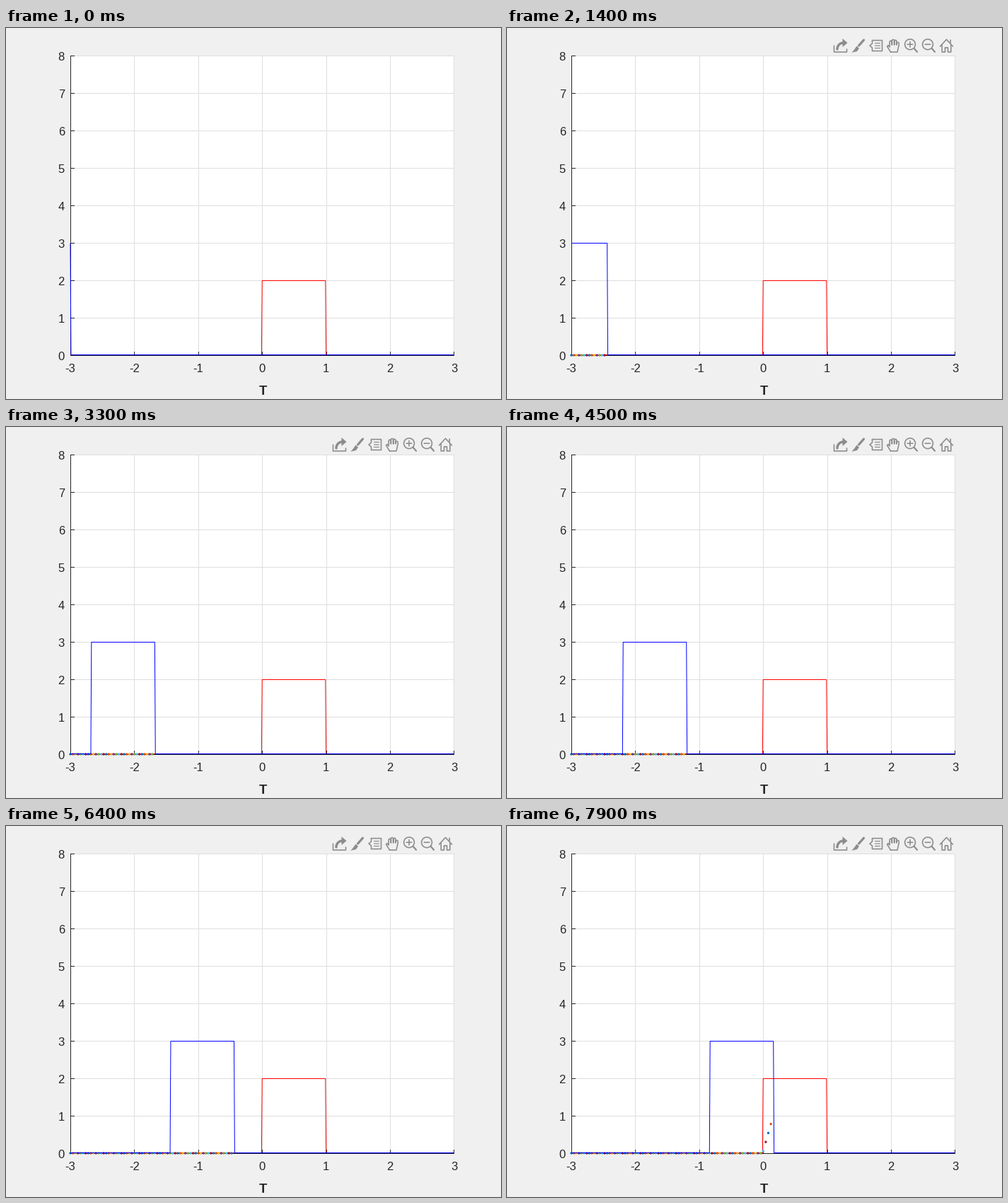
Recreate the animation shown at these times as a matplotlib script. Size 700x525 px, loop 8 s.

```python
import matplotlib.pyplot as plt
import numpy as np
from matplotlib.animation import FuncAnimation
from matplotlib.patches import Circle, Polygon, Rectangle

W, H, DPI = 700, 525, 100
PT = 72 / DPI                       # points per pixel
FRAMES, STEP = 80, 0.04
X0, XS = 91.0, 542.5 / 6            # plot left edge, pixels per unit
Y0, YS = 463.0, 52.95               # plot baseline, pixels per unit
DARK, GREY = "#262626", "#8c8c8c"
ORDER = ["#0072bd", "#d95319", "#edb120", "#7e2f8e",
         "#77ac30", "#4dbeee", "#a2142f"]

plt.rcParams["font.family"] = "Liberation Sans"
fig = plt.figure(figsize=(W / DPI, H / DPI), dpi=DPI, facecolor="#f0f0f0")
ax = fig.add_axes([0, 0, 1, 1])
ax.set_xlim(0, W)
ax.set_ylim(H, 0)
ax.axis("off")


def px(t):
    return X0 + (np.asarray(t) + 3) * XS


def py(v):
    return Y0 - np.asarray(v) * YS


def row(v):
    """Centre of the pixel row that holds a level."""
    return np.floor(py(v) - 0.01) + 0.5


def line(xs, ys, color, width=1.0, z=1, cap="butt"):
    return ax.plot(xs, ys, color=color, lw=width * PT, zorder=z, snap=False,
                   solid_capstyle=cap, solid_joinstyle="round")[0]


def label(x, y, s, size=16.67, **kw):
    ax.text(x, y, s, fontsize=size * PT, color=DARK, va="baseline", **kw)


def pulse(first, last, height):
    """Sampled box that is non-zero from first to last."""
    t = np.array([-3, first - 0.01, first, last, last + 0.01, 3])
    v = np.array([0, 0, height, height, 0, 0])
    if first < -3:
        t, v = np.maximum(t[2:], -3), v[2:]
    return px(t), row(v)


def draw_axes():
    left, right, top, bottom = 91, 634, 39, 463
    ax.add_patch(Rectangle((left, top), right - left, bottom + 1 - top,
                           fc="white", lw=0, zorder=0))
    for t in range(-3, 4):
        x = round(px(t) - 0.1) + 0.5
        line([x, x], [top, bottom], "#dedede")
        line([x, x], [bottom - 5, bottom], DARK, z=2)
        label(px(t), 487, str(t), ha="center")
    for v in range(9):
        y = bottom - 53 * v + 0.5
        line([left, right], [y, y], "#dedede")
        line([left, left + 6], [y, y], DARK, z=2)
        label(83, y + 6.5, str(v), ha="right")
    line([left + 0.5] * 2, [top, bottom + 1], DARK, z=2)
    line([left, right], [bottom + 0.5] * 2, DARK, z=2)
    label(363, 519, "T", 18.33, ha="center", weight="bold")


class Icon:
    """Toolbar glyph drawn around its own centre."""

    parts = []

    def __init__(self, slot):
        self.c = np.array([471.5 + 25 * slot, 25])

    def stroke(self, *pts, width=1.6):
        xs, ys = (self.c + pts).T
        self.parts.append(line(xs, ys, GREY, width, 6, "round"))

    def patch(self, shape):
        self.parts.append(ax.add_patch(shape))

    def fill(self, *pts):
        self.patch(Polygon(self.c + pts, fc=GREY, lw=0, zorder=6))

    def ring(self, x, y, r):
        self.patch(Circle(self.c + (x, y), r, fill=False, ec=GREY,
                          lw=1.6 * PT, zorder=6))


def arc(x, y, rx, ry, start, end, n=12):
    a = np.linspace(start, end, n)
    return list(zip(x + rx * np.cos(a), y - ry * np.sin(a)))


def export(i):
    i.stroke((-9, 0), (-9, 9), (9, 9), (9, 5))
    i.stroke(*arc(4, 5, 8.5, 9, np.pi, np.pi / 2), width=3.4)
    i.fill((3, -10), (10, -4), (3, 2))


def brush(i):
    i.stroke((8, -8), (1, 0), width=3.2)
    i.fill((-2, 0.5), (1.5, 3.7), (-1.5, 8), (-9, 9.8), (-5, 5))


def data_tip(i):
    i.stroke((-5, -7.5), (9, -7.5), (9, 7.5), (-5, 7.5), (-5, 3), (-8.5, 0),
             (-5, -3), (-5, -7.5))
    for y in (-3.5, 0, 3.5):
        i.stroke((-1, y), (6, y), width=1.2)


def hand(i):
    outline = [(-4, 9), (-9, 1), (-7.5, -0.5), (-5.4, 2)]
    for k in range(4):
        x = -3.8 + 3.3 * k
        outline += arc(x, -7 + 1.2 * (k - 1.2) ** 2, 1.6, 1.6, np.pi, 0)
        outline.append((x + 1.65, -1))
    i.stroke(*outline, (5.5, 9), (-4, 9))


def zoom(i, plus):
    i.ring(-1.5, -1.8, 7.4)
    i.stroke((4.3, 4), (8.5, 8.8), width=2.2)
    i.stroke((-5.3, -1.8), (2.3, -1.8))
    if plus:
        i.stroke((-1.5, -5.6), (-1.5, 2))


def home(i):
    i.stroke((-9, 1), (0, -8.8), (9, 1))
    i.stroke((5.7, -8), (5.7, -4))
    for side in (-1, 1):
        i.stroke((6.3 * side, -1), (6.3 * side, 9), (2 * side, 9),
                 (2 * side, 2.8), (0, 2.8))


def draw_toolbar():
    glyphs = [export, brush, data_tip, hand, lambda i: zoom(i, True),
              lambda i: zoom(i, False), home]
    for slot, glyph in enumerate(glyphs):
        glyph(Icon(slot))
    return Icon.parts


draw_axes()
toolbar = draw_toolbar()

red = line(*pulse(0, 0.99, 2), "#ff0000", z=3)
blue = line([], [], "#0000ff", z=5)

idx = np.arange(FRAMES)
lags = -3 + STEP * idx
area = 6 * np.where(lags > -1e-9, lags + 0.01, 0)
spots = np.column_stack([px(lags), py(area)])
hues = [ORDER[i % 7] for i in idx]
dots = ax.scatter([], [], s=(3.4 * PT) ** 2, linewidths=0, zorder=4)
dots.set_snap(False)


def update(k):
    blue.set_data(*pulse(lags[k] - 0.99, lags[k], 3))
    dots.set_offsets(spots[:k])
    dots.set_facecolors(hues[:k])
    for part in toolbar:
        part.set_visible(k > 0)
    return [blue, dots, *toolbar]


anim = FuncAnimation(fig, update, frames=FRAMES, interval=100,
                     init_func=lambda: update(0), repeat=True,
                     repeat_delay=0, blit=False)
plt.show()
```
